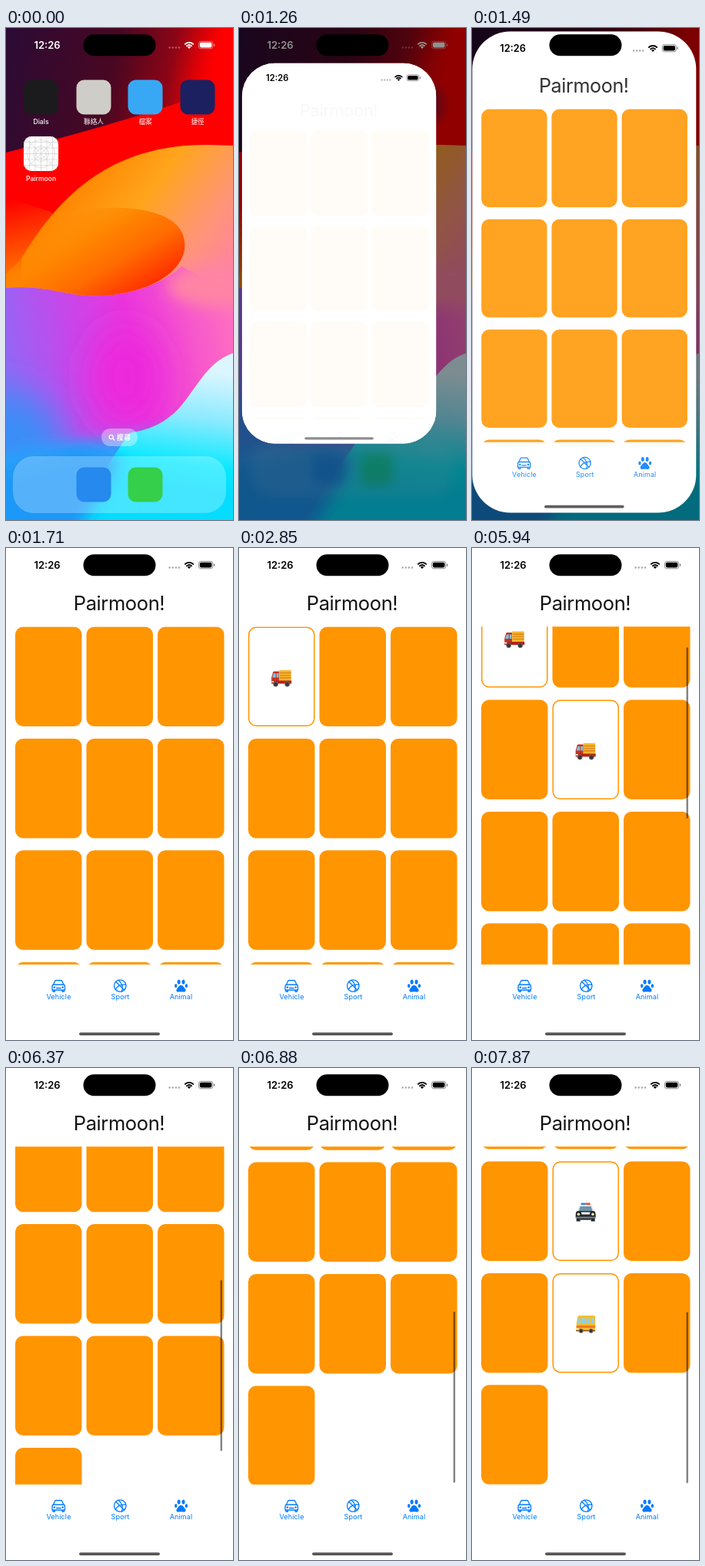
An HTML page that plays this animation: 295x640 px, repeating every 8000 ms.

```html
<!DOCTYPE html>
<html lang="zh-Hant">
<head>
<meta charset="utf-8">
<title>Card game</title>
<style>
  html, body { margin: 0; width: 100%; height: 100%; overflow: hidden; background: #fff; }
  svg { display: block; width: 100%; height: 100%; }
  text { font-family: Inter, "Noto Sans CJK TC", "Noto Sans CJK", sans-serif; text-anchor: middle; }
  .line { fill: none; stroke-linecap: round; stroke-linejoin: round; }
  .label { fill: #fff; font-size: 8.6px; font-weight: 500; }
  .tab { color: #007aff; fill: #007aff; font-size: 9.1px; letter-spacing: .1px; }
</style>
</head>
<body>
<svg viewBox="0 0 295 640">
  <defs>
    <linearGradient id="night" x1="0" y1="0" x2="1" y2=".12">
      <stop offset="0" stop-color="#2b0b35"/><stop offset=".5" stop-color="#480722"/>
      <stop offset=".75" stop-color="#8c0516"/><stop offset=".95" stop-color="#f00"/>
    </linearGradient>
    <linearGradient id="ember" gradientUnits="userSpaceOnUse" x1="0" y1="225" x2="25" y2="325">
      <stop offset="0" stop-color="#f00"/><stop offset="1" stop-color="#ff7a00"/>
    </linearGradient>
    <linearGradient id="sun" gradientUnits="userSpaceOnUse" x1="90" y1="200" x2="285" y2="345">
      <stop offset="0" stop-color="#ff8500"/><stop offset=".35" stop-color="#ffa51c"/>
      <stop offset=".7" stop-color="#ff9577"/><stop offset="1" stop-color="#ff80a6"/>
    </linearGradient>
    <linearGradient id="peel" gradientUnits="userSpaceOnUse" x1="90" y1="232" x2="160" y2="350">
      <stop offset="0" stop-color="#ff8a00" stop-opacity="0"/><stop offset=".35" stop-color="#ff8500"/>
      <stop offset=".65" stop-color="#ff6c00"/><stop offset="1" stop-color="#ff3200"/>
    </linearGradient>
    <linearGradient id="orchid" gradientUnits="userSpaceOnUse" x1="0" y1="430" x2="295" y2="370">
      <stop offset="0" stop-color="#9367f5"/><stop offset=".25" stop-color="#c04bec"/>
      <stop offset=".55" stop-color="#ea35dd"/><stop offset="1" stop-color="#ff70c0"/>
    </linearGradient>
    <linearGradient id="sky" gradientUnits="userSpaceOnUse" x1="255" y1="445" x2="235" y2="600">
      <stop offset="0" stop-color="#dcf6ff"/><stop offset=".4" stop-color="#8ceaff"/>
      <stop offset=".8" stop-color="#06e9ff"/><stop offset="1" stop-color="#05dcff"/>
    </linearGradient>
    <filter id="soft" x="-60%" y="-60%" width="220%" height="220%"><feGaussianBlur stdDeviation="24"/></filter>
    <filter id="hazy" x="-60%" y="-60%" width="220%" height="220%"><feGaussianBlur stdDeviation="10"/></filter>

    <clipPath id="windowClip"><rect id="windowShape"/></clipPath>
    <clipPath id="listClip"><rect y="102.3" width="295" height="439.5"/></clipPath>

    <g id="status" fill="currentColor">
      <text x="53.5" y="26.7" font-size="13" font-weight="600">12:26</text>
      <g opacity=".35">
        <circle cx="212.7" cy="25.5" r="1.2"/><circle cx="216.8" cy="25.5" r="1.2"/>
        <circle cx="220.9" cy="25.5" r="1.2"/><circle cx="225" cy="25.5" r="1.2"/>
      </g>
      <path class="line" stroke="currentColor" stroke-width="1.9"
        d="M232.8 20.900a7.600 7.600 0 0 1 10.400 0M235 23.300a4.600 4.600 0 0 1 6 0"/>
      <path d="M235.900 24.900a3 3 0 0 1 4.200 0L238 27z"/>
      <rect x="250.400" y="17.400" width="18.400" height="9.400" rx="3" fill="none" stroke="currentColor" stroke-opacity=".45"/>
      <rect x="251.800" y="18.800" width="15.600" height="6.600" rx="1.800"/>
      <rect x="270" y="20.400" width="1.300" height="3.400" rx=".6" opacity=".5"/>
    </g>

    <g id="truck">
      <path fill="#c8321f" d="M-13 5V0l2-7q.4-1 1.5-1H-3V5z"/>
      <path fill="#79c4e4" d="M-12 0l1.6-5.6h3V0zM-6.4-5.6h2.7V0h-2.7z"/>
      <path fill="#f5b42c" d="M-3-9.5H12.5V4.5H-3z"/>
      <path class="line" stroke="#d57c17" stroke-width="1.1" d="M-2-6H12M-2-2.8H12M-2 .4H12"/>
      <path fill="#b32316" d="M-13 4H13v4h-26z"/>
      <path fill="#eee" d="M-13 4.5h3v1.8h-3z"/>
      <g fill="#34383c" stroke="#777" stroke-width=".7"><circle cx="-7.5" cy="8.7" r="3"/><circle cx="7.5" cy="8.7" r="3"/></g>
    </g>
    <g id="train">
      <g fill="#d5d8da"><circle cx="-4" cy="-10.5" r="2.8"/><circle cx="0" cy="-11.5" r="2.4"/><circle cx="4" cy="-10.8" r="2"/><circle cx="-6" cy="-8" r="1.8"/></g>
      <path fill="#2e3338" d="M-11-2H4v8h-15zM-9-7h4l-.8 5h-2.4zM-2-4.5h3V-2h-3z"/>
      <path fill="#e14b43" d="M4-3h8v9H4z"/><path fill="#9d2723" d="M2.5-5H13v2H2.5z"/>
      <path fill="#a9d9ee" d="M5.5-1.5h2v3h-2zM9-1.5h2v3H9z"/>
      <path fill="#b9352f" d="M-13 10l3-4h22v3h-20l-1 2z"/>
      <g fill="#444a50" stroke="#d95a53"><circle cx="-6" cy="9.5" r="2.5"/><circle cx="0" cy="9.5" r="2.5"/><circle cx="8" cy="9" r="3"/></g>
      <circle cx="-11" cy="1.5" r="2" fill="#c9a84c"/>
    </g>
    <g id="police">
      <path fill="#3c83d8" d="M-6-12h6v3h-6z"/><path fill="#e5463d" d="M0-12h6v3H0z"/>
      <path fill="#e9edf0" d="M-7-9.5H7q1.3 0 1.8 1.5l2.6 7.5h-22.8l2.6-7.5Q-8.3-9.5-7-9.5z"/>
      <path fill="#6d94aa" d="M-7-7.5H7L9-1.5H-9z"/>
      <path fill="#25292d" d="M-11-1.5h22q2 1.5 2 4V7h-26V2.5q0-2.5 2-4zM-12 7h5v5h-5zM7 7h5v5H7z"/>
      <path fill="#f3f5f6" d="M-6 0H6l-1 3H-5z"/><path fill="#777f86" d="M-13 6h26v2h-26z"/>
      <g fill="#ffe9a3"><circle cx="-9.3" cy="2.8" r="1.8"/><circle cx="9.3" cy="2.8" r="1.8"/></g>
      <path fill="#13161a" d="M-7 8H7v2H-7z"/>
    </g>
    <g id="bus">
      <path fill="#f6bd2b" d="M-12 9V0l1.5-9q.4-2 2.4-2H10.5q2 0 2 2V9z"/>
      <path fill="#8fd0e8" d="M-10.8 0l1.2-7.5h3V0zM-5-7.5H-.5V-1H-5zM1-7.5h4.5V-1H1zM7-7.5h4V-1H7z"/>
      <path fill="#ee7e1f" d="M-12 2h24.5v3.200H-12z"/><path fill="#fff0c0" d="M-12 5.800h3v1.700h-3z"/>
      <path fill="#8b4a18" d="M-12.500 8h25v1.600h-25z"/>
      <g fill="#34383c" stroke="#888" stroke-width=".8"><circle cx="-6" cy="9" r="2.700"/><circle cx="7" cy="9" r="2.700"/></g>
    </g>
  </defs>

  <g id="wallpaper">
    <rect width="295" height="640" fill="#f00"/>
    <path fill="url(#night)" d="M0 0H295V72C210 104 130 128 0 162z"/>
    <ellipse cx="300" cy="70" rx="45" ry="60" fill="#f00" filter="url(#soft)"/>
    <path fill="url(#ember)" d="M0 220L60 240V360H0z"/>
    <path fill="url(#sun)" d="M20 300C70 215 140 150 265 152L295 153V430H20z"/>
    <path fill="url(#orchid)" d="M0 338C45 334 70 345 105 348C165 351 210 328 228 310L295 345V640H0z"/>
    <ellipse cx="275" cy="335" rx="65" ry="28" fill="#ff84a4" filter="url(#hazy)"/>
    <path fill="url(#peel)" d="M0 338C45 334 70 345 105 348C165 351 225 328 232 288C236 252 200 236 150 234C100 232 60 250 30 290L0 320z"/>
    <ellipse cx="155" cy="455" rx="45" ry="65" fill="#ee28dc" filter="url(#soft)"/>
    <ellipse cx="-10" cy="545" rx="85" ry="75" fill="#3b8df7" filter="url(#soft)"/>
    <path fill="#2da0fb" filter="url(#hazy)" d="M-30 560C50 535 100 545 190 527L320 500V670H-30z"/>
    <path fill="url(#sky)" d="M295 423C264 433 249 465 228 491C208 514 188 522 160 527L85 640H295z"/>
    <path fill="#1a98f8" filter="url(#hazy)" d="M-30 580L95 545L150 560L85 670H-30z"/>
  </g>
  <g id="icons">
    <rect x="124" y="521" width="47" height="23" rx="11.500" fill="#fff" opacity=".36"/>
    <path class="line" stroke="#fff" stroke-width="1.400" d="M139.300 532a2.600 2.600 0 1 1-5.200 0a2.600 2.600 0 1 1 5.200 0M138.800 534l2 2"/>
    <text class="label" x="153" y="535.700" style="font-size:9px;font-weight:700">搜尋</text>
    <rect x="9" y="557" width="277" height="74" rx="27" fill="#fff" opacity=".25"/>
  </g>
  <use href="#status" color="#fff"/>
  <rect id="dim" width="295" height="640"/>

  <g id="window" clip-path="url(#windowClip)">
    <rect width="295" height="640" fill="#fff"/>
    <g id="app">
      <text x="147" y="81" font-size="25.500" letter-spacing="-.4" fill="#111">Pairmoon!</text>
      <g clip-path="url(#listClip)"><g id="cards"></g></g>
      <rect id="scrollbar" x="278.500" width="2.500" rx="1.250" fill="#000" opacity=".48"/>
      <g class="tab">
        <g class="line" stroke="currentColor" stroke-width="1.300">
          <path d="M61.500 568l2-4.500q.4-1 1.500-1h6.500q1.100 0 1.500 1l2 4.500M61.500 568h13.500M60 575v-4.500q0-2.500 2-2.500h12.500q2 0 2 2.500V575zM61 575v2h2.500v-2M73 575v2h2.500v-2M65.500 572.500h5.500"/>
          <circle cx="148.300" cy="569.500" r="7.700"/>
          <path d="M142.800 564.200L153.800 575M146 562.200C151 566 152 572 150.500 577M155.800 568C150 567 144 570 142.300 574.500"/>
        </g>
        <circle cx="62.800" cy="571.500" r="1.300"/><circle cx="73.700" cy="571.500" r="1.300"/>
        <path d="M227.500 568.800c2.800 0 3.300 2.600 5 4.200c2.200 2 .8 4.900-1.800 4.600c-2.200-.3-4.200-.3-6.400 0c-2.600.3-4-2.600-1.800-4.600c1.700-1.600 2.200-4.200 5-4.200z"/>
        <ellipse cx="224.600" cy="564.500" rx="2" ry="3"/><ellipse cx="230.500" cy="564.500" rx="2" ry="3"/>
        <ellipse cx="220.700" cy="569.500" rx="1.700" ry="2.600"/><ellipse cx="234.400" cy="569.500" rx="1.700" ry="2.600"/>
        <text x="68.500" y="587.300">Vehicle</text><text x="148.500" y="587.300">Sport</text><text x="227.500" y="587.300">Animal</text>
      </g>
      <rect id="veil" width="295" height="640" fill="#fff"/>
      <use href="#status" color="#000"/>
    </g>
    <rect id="homeBar" rx="2"/>
  </g>
  <rect x="100.500" y="8.300" width="94" height="28" rx="14"/>
</svg>

<script>
const LOOP = 8000, OPEN = 1150, OPENED = 1710, SCROLL = 5940;
const CARD_COUNT = 16, PITCH_X = 92.5, PITCH_Y = 145.4;
const VIEW_TOP = 102.5, VIEW_H = 439.5, CONTENT_H = 856.7, MAX_SCROLL = CONTENT_H - VIEW_H;

const $ = id => document.getElementById(id);
const clamp = (v, lo = 0, hi = 1) => Math.min(hi, Math.max(lo, v));
const snap = (t, start, step) => start + Math.floor((t - start) / step) * step;

function set(node, attrs) {
  for (const name in attrs) node.setAttribute(name, attrs[name]);
  return node;
}
function add(parent, tag, attrs, text = '') {
  const node = set(document.createElementNS('http://www.w3.org/2000/svg', tag), attrs);
  node.textContent = text;
  return parent.appendChild(node);
}

function addIcon(x, y, fill, name = '') {
  add($('icons'), 'rect', { x: x - 22.5, y: y - 22.5, width: 45, height: 45, rx: 10, fill });
  add($('icons'), 'text', { class: 'label', x, y: y + 35 }, name);
}
addIcon(45.5, 90, '#1b1b1d', 'Dials');
addIcon(114, 90, '#cfcdc8', '聯絡人');
addIcon(181, 90, '#38a8f5', '檔案');
addIcon(249, 90, '#1c2060', '捷徑');
addIcon(45.5, 163.5, '#fff', 'Pairmoon');
addIcon(114, 594, '#2589ee');
addIcon(181, 594, '#35cf4b');

// Drafting grid on the blank app icon
const grid = add($('icons'), 'g', { class: 'line', stroke: '#c9c9cc', 'stroke-width': .6, transform: 'translate(45.5 163.5)' });
for (const p of [-15, -7.5, 0, 7.5, 15]) add(grid, 'path', { d: `M${p}-22.5V22.5M-22.5 ${p}H22.5` });
for (const r of [6, 10, 18]) add(grid, 'circle', { r });
add(grid, 'path', { d: 'M-20-20L20 20M20-20L-20 20' });

// Face-up periods of the cards that get tapped
const taps = {
  0: { art: 'truck', from: 2850 },
  1: { art: 'train', from: 3570, to: 5060 },
  4: { art: 'truck', from: 4440 },
  10: { art: 'police', from: 7870 },
  13: { art: 'bus', from: 7290 },
};
const cards = Array.from({ length: CARD_COUNT }, (_, i) => {
  const x = 12 + i % 3 * PITCH_X, y = VIEW_TOP + Math.floor(i / 3) * PITCH_Y;
  const g = add($('cards'), 'g', { transform: `translate(${x} ${y})` });
  const back = add(g, 'rect', { x: .75, y: .75, width: 85, height: 128, rx: 9.5, stroke: '#ff9500', 'stroke-width': 1.5 });
  const tap = taps[i];
  const art = tap && add(g, 'use', { href: '#' + tap.art, transform: 'translate(43.2 66)' });
  return { back, tap, art };
});

// The app window grows from its icon while the home screen dims and blurs
function drawOpening(t) {
  const done = t >= OPENED;
  const now = snap(t, OPEN, 110);
  const left = done ? 0 : Math.exp(-(now - 1094) / 94);
  const x = 23 * left, w = 295 - 227 * left - x;
  const y = 141 * Math.min(1, left * 1.9), bottom = 640 - 454 * Math.min(1, left * 1.28);
  const scale = w / 295;

  $('window').style.display = t < OPEN ? 'none' : '';
  set($('windowShape'), { x, y, width: w, height: bottom - y, rx: done ? 0 : 50 * scale });
  set($('app'), { transform: `translate(${x} ${y}) scale(${scale})` });
  const veil = done ? 0 : clamp((1515 - now) / 260, 0, .97);
  set($('veil'), { opacity: veil });
  set($('homeBar'), {
    x: x + 95 * scale, y: bottom - 9.8 * scale, width: 105 * scale, height: 3.8 * scale,
    opacity: .66 - .22 * veil,
  });

  const away = t < OPEN ? 0 : 1 - left;
  set($('dim'), { opacity: .52 * away });
  set($('icons'), { transform: `translate(147 250) scale(${1 - .07 * away}) translate(-147 -250)` });
  $('icons').style.filter = away ? `blur(${9 * away}px)` : 'none';
  $('icons').style.opacity = 1 - .7 * away;
}

function drawGame(t) {
  const p = clamp((snap(t, SCROLL, 107) - 5890) / 1000);
  const offset = t < SCROLL ? 0 : MAX_SCROLL * (1 - (1 - p) ** 2.51);
  set($('cards'), { transform: `translate(0 ${-offset})` });
  set($('scrollbar'), {
    y: VIEW_TOP + 1 + offset / CONTENT_H * VIEW_H,
    height: VIEW_H * VIEW_H / CONTENT_H - 3,
    visibility: t < SCROLL ? 'hidden' : 'visible',
  });
  for (const { back, tap, art } of cards) {
    const up = tap && t >= tap.from && t < (tap.to || LOOP);
    set(back, { fill: up ? '#fff' : '#ff9500' });
    if (art) set(art, { visibility: up ? 'visible' : 'hidden' });
  }
}

const start = performance.now();
function frame() {
  const t = (performance.now() - start) % LOOP;
  drawOpening(t);
  drawGame(t);
  requestAnimationFrame(frame);
}
frame();
</script>
</body>
</html>
```
